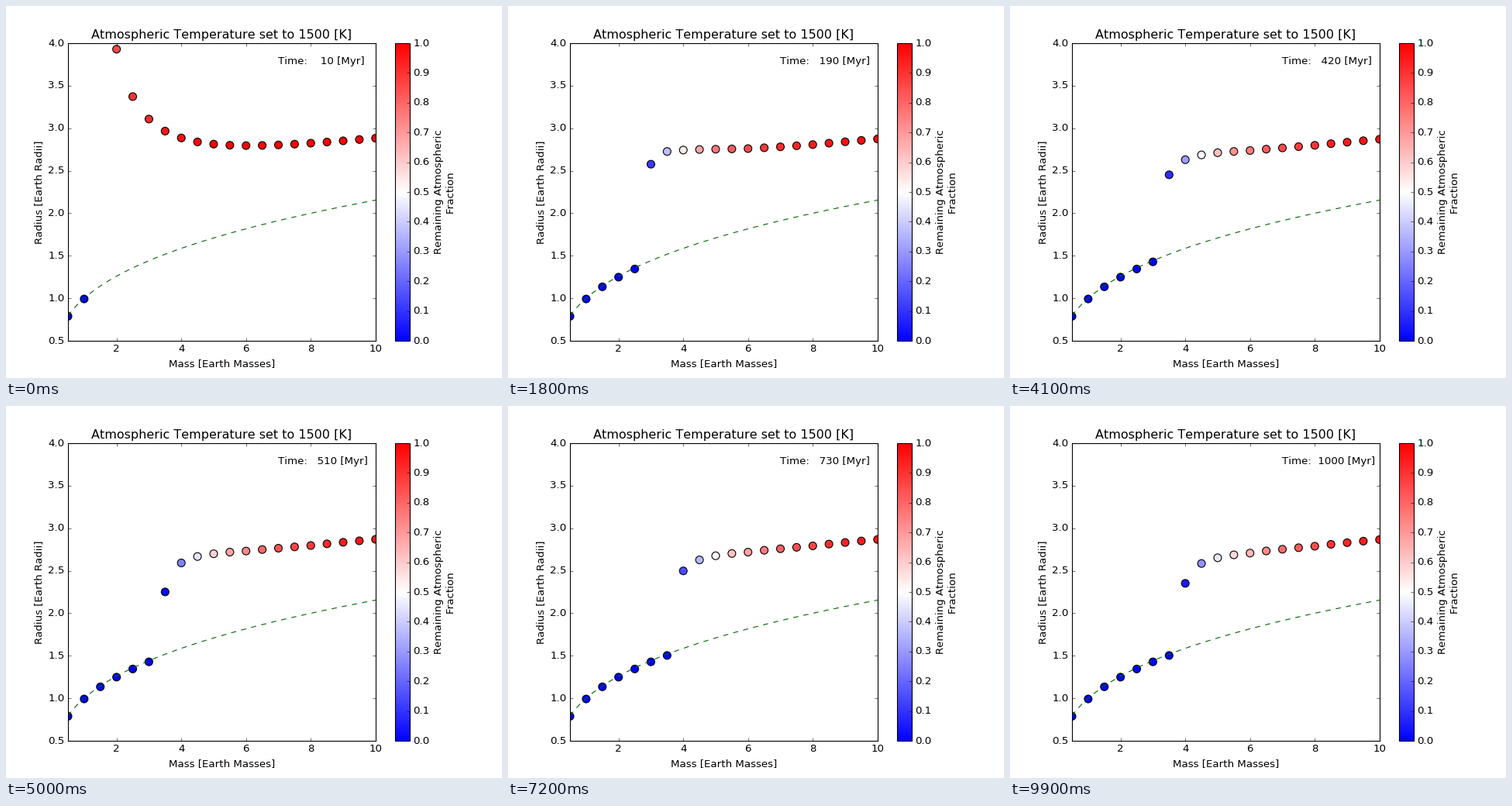
A matplotlib script that plays this animation: 640x480 px, repeating every 10000 ms.

```python
import numpy as np
import matplotlib.pyplot as plt
from matplotlib.animation import FuncAnimation

plt.style.use("classic")
plt.rcParams.update({
    "font.family": "DejaVu Sans",
    "text.kerning_factor": 6,   # text without pair kerning
    "figure.facecolor": "white",
    "savefig.dpi": "figure",
})

FRAMES = 100
STEP = 10      # Myr per frame
SLOPE = 0.18   # envelope thickness goes as fraction ** SLOPE

mass = np.arange(0.5, 10.1, 0.5)
core = 0.992 * mass ** 0.332
envelope = 1.867 * mass ** -0.42 * np.exp(1.847 * mass ** -1.5)

# Dose of radiation that strips a planet bare, and how the loss speeds up
limit = np.interp(mass, [1, 3, 4, 6, 8, 10], [0.05, 1.9, 3.5, 7.3, 14, 34])
power = np.clip(0.23 + 0.2 * mass, 0.85, 1.3)


def fraction(t):
    """Remaining atmosphere; the dose is linear to 100 Myr, then logarithmic."""
    dose = t / 100 if t < 100 else 1 + np.log(t / 100)
    return np.clip(1 - (dose / limit) ** power, 0, 1)


def radius(t):
    ratio = fraction(t) / np.maximum(fraction(STEP), 1e-9)
    cooling = (t / STEP) ** -0.003
    return core + envelope * ratio ** SLOPE * cooling


fig, ax = plt.subplots(figsize=(8, 6), dpi=80)
dots = ax.scatter(mass, radius(STEP), c=fraction(STEP), s=80, cmap="bwr",
                  vmin=0, vmax=1, edgecolors="black", linewidths=1)
curve = np.linspace(0.5, 10, 200)
ax.plot(curve, curve ** (1 / 3), "--", color="darkgreen")
label = ax.text(7, 3.75, "")

ax.set_xlim(0.5, 10)
ax.set_ylim(0.5, 4)
ax.set_xticks(range(2, 11, 2))
ax.set_yticks(np.arange(0.5, 4.1, 0.5))
ax.set_xlabel("Mass [Earth Masses]")
ax.set_ylabel("Radius [Earth Radii]")
ax.set_title("Atmospheric Temperature set to 1500 [K]")

bar = fig.colorbar(dots, ax=ax, ticks=np.linspace(0, 1, 11), format="%.1f")
bar.set_label("Remaining Atmospheric\nFraction")


def update(frame):
    t = STEP * (frame + 1)
    dots.set_offsets(np.column_stack([mass, radius(t)]))
    dots.set_array(fraction(t))
    label.set_text(f"Time: {t:5d} [Myr]")
    return dots, label


anim = FuncAnimation(fig, update, frames=FRAMES, interval=100, repeat=True)
plt.show()
```
